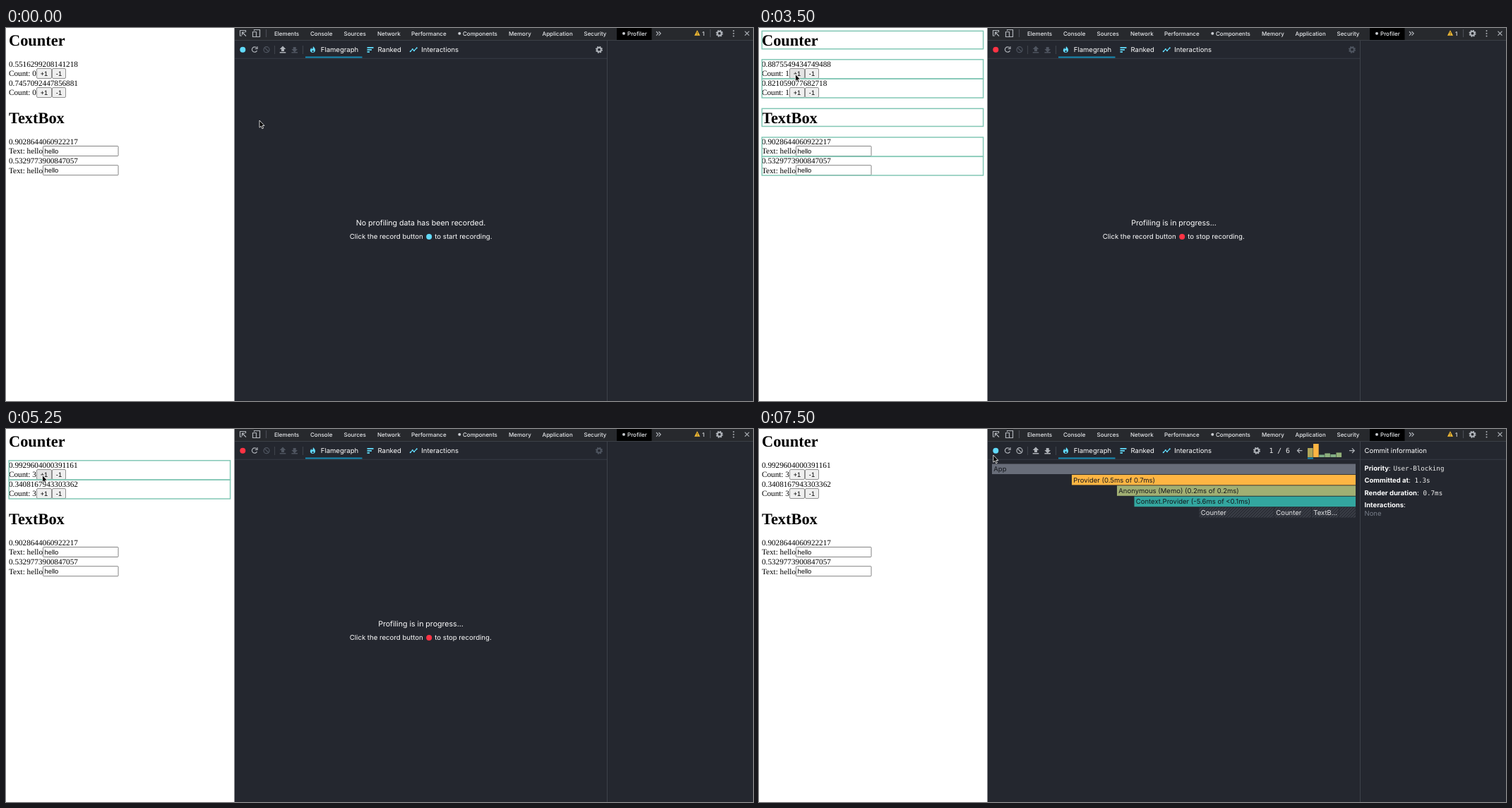
These frames come from a looping animation (1058 by 529 pixels, 8 s). An HTML page:

```html
<!DOCTYPE html>
<html lang="en">
<head>
<meta charset="utf-8">
<title>Profiler recording</title>
<style>
  html, body { margin: 0; width: 100%; height: 100%; overflow: hidden; background: #fff; }
  svg { display: block; width: 1058px; height: 529px; }
  text { white-space: pre; text-rendering: geometricPrecision; }
  .page { font: 11.2px "Liberation Serif", serif; }
  .heading { font: bold 22.4px "Liberation Serif", serif; }
  .control { font: 9.33px "Liberation Sans", sans-serif; }
  .tab { font: 500 8px Inter, sans-serif; fill: #e8eaed; }
  .ui { font: 9.5px Inter, sans-serif; fill: #fff; }
  .hint { font: 9.65px Inter, sans-serif; fill: #fff; }
  .title { font: 10.6px Inter, sans-serif; fill: #fff; }
  .bold { font-weight: 700; }
  .mono { font: 9.2px "DejaVu Sans Mono", monospace; fill: #eee; }
  .middle { text-anchor: middle; }
  .end { text-anchor: end; }
  .line { fill: none; stroke: currentColor; stroke-width: 1.2; }
</style>
</head>
<body>
<svg id="stage" viewBox="0 0 1058 529"></svg>
<script>
const STEP = 250, LOOP = 8000;
const BLUE = '#61dafb', RED = '#ff3344', BRIGHT = '#afb3b9', DIM = '#4f5560';

const text = (x, y, cls, content, extra = '') =>
  `<text x="${x}" y="${y}" class="${cls}" ${extra}>${content}</text>`;
const rect = (x, y, w, h, fill, extra = '') =>
  `<rect x="${x}" y="${y}" width="${w}" height="${h}" fill="${fill}" ${extra}/>`;
const dot = (x, y, r, fill, extra = '') => `<circle cx="${x}" cy="${y}" r="${r}" fill="${fill}" ${extra}/>`;
const path = (d, color = BRIGHT, extra = 'class="line"') =>
  `<path d="${d}" color="${color}" ${extra}/>`;
const group = (id, content) => `<g id="${id}">${content}</g>`;
const gear = (x, y) => `<g transform="translate(${x} ${y})" class="line">
  <circle r="2.9" stroke-width="2"/><circle r="4.3" stroke-width="1.5" stroke-dasharray="1.9 1.477"/></g>`;
const arrow = (x, dir) => `<path fill="currentColor" transform="translate(${x} 30) scale(1 ${dir})"
  d="M0-4.5L4.3 0H2V3H-2V0H-4.3Z"/>` + rect(x - 4.3, 34, 8.6, 1.5, 'currentColor');

function button(id, x, y, w, label) {
  return rect(x + .5, y + .5, w - 1, 14, '#efefef', `id="${id}" rx="1.5" stroke="#767676" stroke-width=".8"`) +
    text(x + w / 2, y + 11, 'control middle', label);
}

function counter(i) {
  const y = 54.6 + i * 27.2, top = 57 + i * 27;
  return text(4, y, 'page', '', `id="random${i}"`) + text(4, y + 13.5, 'page', '', `id="count${i}"`) +
    button('plus' + i, 43, top, 22, '+1') + button('minus' + i, 65, top, 20, '-1');
}

function textBox(i, value) {
  const y = 164.8 + i * 27.2;
  return text(4, y, 'page', value) + text(4, y + 13.5, 'page', 'Text: hello') +
    rect(52.5, 167.5 + i * 27.2, 106.5, 14, '#fff', 'stroke="#767676" stroke-width=".9" rx=".8"') +
    text(54.5, y + 13.2, 'control', 'hello');
}

const outlines = boxes => boxes.map(([y, h]) =>
  rect(4.2, y, 313.4, h, 'none', 'stroke="#82c7b5" stroke-width="1.5"')).join('');

function page() {
  return rect(0, 0, 324, 529, '#fff') +
    text(4, 24.5, 'heading', 'Counter') + counter(0) + counter(1) +
    text(4, 134.8, 'heading', 'TextBox') + textBox(0, '0.9028644060922217') + textBox(1, '0.5329773900847057') +
    group('counterOutlines', outlines([[44.7, 27.3], [72, 27]])) +
    group('otherOutlines', outlines([[4.3, 25.4], [114.3, 25.2], [155, 27.3], [182.3, 26.7]]));
}

function tabBar() {
  const tabs = [[380, 'Elements'], [431, 'Console'], [478.5, 'Sources'], [526, 'Network'], [574, 'Performance'],
    [647, 'Components'], [712, 'Memory'], [759.5, 'Application'], [818.5, 'Security'], [880, 'Profiler']];
  return rect(324, 0, 734, 17, '#27292d') + rect(324, 17, 734, 1, '#3c4047') + rect(865, 0, 49.5, 17, '#000') +
    tabs.map(([x, name]) => text(x, 10.6, 'tab', name)).join('') +
    dot(642.3, 7.7, 2, '#c8cbd0') + dot(875, 7.7, 2, '#c8cbd0') +
    path('M334 11H331.5V3.5H339.5V6M334.5 6L340 11.5M334.5 10V6H338.5') +
    path('M351.5 4V2.5H359.5V12.5H355M349.5 5.5H354.5V12.5H349.5Z') + path('M368.5 2V13', '#484c53') +
    path('M921 5L923.7 7.8L921 10.6M924.5 5L927.2 7.8L924.5 10.6') +
    path('M979 3L983 10.8H975Z', '', 'fill="#f5bd36"') + rect(978.6, 5.6, .9, 2.7, '#40310c') +
    rect(978.6, 9, .9, .9, '#40310c') + text(986, 10.6, 'tab', '1') + path('M997.5 2V13', '#484c53') +
    `<g color="${BRIGHT}">${gear(1010.5, 7.7)}</g>` +
    [4, 7.8, 11.6].map(y => dot(1030.5, y, 1, BRIGHT)).join('') +
    path('M1046.5 4.7L1052.5 10.7M1052.5 4.7L1046.5 10.7');
}

function toolbar() {
  return dot(335.3, 30.7, 4, BLUE, 'id="record"') +
    path('M355 28.2A3.7 3.7 0 1 0 355.5 32M356 26.3V29.5H352.8') +
    `<g id="clear" class="line"><circle cx="369" cy="30.7" r="4"/><path d="M366.2 27.9L371.8 33.5"/></g>` +
    group('upload', arrow(392, 1)) + group('download', arrow(408.7, -1)) +
    path('M380.5 25V37M420.5 25V37', '#3d424a') +
    path('M435 26C437 28 438.3 29.5 438 32C437.6 36 431.2 36 430.8 32C430.7 30 432 29 432.4 28C433 29 433 30 433.5 30C434.8 29 434.8 27.5 435 26Z',
      '', `fill="${BLUE}"`) + dot(434.6, 33, 1.2, '#24272f') +
    rect(511.5, 27, 9, 1.8, BLUE) + rect(511.5, 30, 6.5, 1.8, BLUE) + rect(511.5, 33, 3.5, 1.8, BLUE) +
    path('M572.5 33.5L575.8 30L578 32.2L582 28', BLUE) +
    [[572.7, 33.3], [575.8, 30], [578, 32.2], [581.8, 28.2]].map(([x, y]) => dot(x, y, 1, BLUE)).join('') +
    text(445.8, 34.1, 'ui', 'Flamegraph') + text(526.5, 34.1, 'ui', 'Ranked') + text(588.3, 34.1, 'ui', 'Interactions') +
    rect(424, 40.5, 80.5, 2, '#178fb9') + rect(324, 42.8, 527, .8, '#3d424a') + rect(851, 18, 1, 511, '#3d424a');
}

function message(id, title, action, color) {
  return group(id, text(587.5, 279.8, 'title middle', title) +
    text(590.7, 299.4, 'hint end', 'Click the record button') + dot(599.2, 296, 4, color) +
    text(607.3, 299.4, 'hint', `to ${action} recording.`));
}

function flamegraph() {
  const bars = [[330, 845, 0, '#686d79', 'App'], [443, 845, 1, '#feb543', 'Provider (0.5ms of 0.7ms)'],
    [507, 845, 2, '#a1af73', 'Anonymous (Memo) (0.2ms of 0.2ms)'],
    [531.5, 845, 3, '#33a69f', 'Context.Provider (-5.6ms of &lt;0.1ms)'],
    [623.5, 729, 4, 'url(#hatch)', 'Counter'], [730, 782, 4, 'url(#hatch)', 'Counter'],
    [783, 821, 4, 'url(#hatch)', 'TextB...'], [822, 845, 4, 'url(#hatch)', '']];
  const commits = [[13, '#afa557'], [19, '#feb543'], [3.5, '#7fae86'], [5.5, '#8db07c'], [4, '#82ae84'], [6.5, '#92b078']];
  const fields = [['Priority', 'User-Blocking', 58.8, 898.5], ['Committed at', '1.3s', 76.2, 928.5],
    ['Render duration', '0.7ms', 93.6, 940.5], ['Interactions', '', 111, 0]];
  return bars.map(([x, end, row, fill, label]) => {
    const y = 49.5 + row * 15.4;
    return rect(x, y, end - x, 14.5, fill) +
      text(x + 2.3, y + 10.7, 'ui', label, `style="fill:${row < 4 ? '#14171c' : '#e4e5e7'}"`);
  }).join('') +
    text(722.5, 34.1, 'mono', '1 / 6', 'style="font-size:9.8px"') +
    path('M769.5 30.7H762.5M765.8 27.4L762.5 30.7L765.8 34M836 30.7H843.3M840 27.4L843.3 30.7L840 34') +
    commits.map(([h, fill], i) => rect(777 + i * 8.1, 40 - h, 7.6, h, fill)).join('') + rect(777, 40.5, 8, 2, '#178fb9') +
    rect(852, 42.8, 206, .8, '#3d424a') + text(857.5, 34.1, 'ui', 'Commit information') +
    fields.map(([name, value, y, x]) =>
      text(857.5, y, 'ui', `<tspan class="bold">${name}</tspan>:`) + text(x, y, 'mono', value)).join('') +
    text(857.5, 122.7, 'ui', 'None', 'style="fill:#777d88"');
}

document.getElementById('stage').innerHTML = `<defs>
  <pattern id="hatch" width="3" height="3" patternUnits="userSpaceOnUse" patternTransform="rotate(45)">
    <rect width="3" height="3" fill="#292c34"/><rect width="1.2" height="3" fill="#41454e"/></pattern></defs>` +
  page() + rect(323.5, 0, 734.5, 529, '#24272f') + tabBar() + toolbar() + group('gear', gear(0, 30.7)) +
  message('idle', 'No profiling data has been recorded.', 'start', BLUE) +
  message('recording', 'Profiling is in progress...', 'stop', RED) +
  group('processing', text(587.5, 281.8, 'title middle', 'Processing data...') +
    text(587.5, 299.4, 'hint middle', 'This should only take a minute.')) +
  group('results', flamegraph()) +
  `<path id="cursor" d="M0 0V10.2L2.3 8.1L3.9 11.8L5.6 11L4 7.5H7Z" fill="#000" stroke="#fff" stroke-width=".8"/>`;

// Each track lists [start time, value]; a value holds until the next entry.
const tracks = {
  cursor: [[0, [359, 131]], [250, [255, 94]], [500, [128, 62]], [750, [66, 53]], [1000, [51.5, 65.5]],
    [1750, [190, 50]], [2000, [330.7, 36.7]], [2500, [150, 50]], [2750, [51.5, 65.5]],
    [5750, [60, 66]], [6000, [180, 58]], [6250, [329, 46]], [6500, [331.8, 37]]],
  mode: [[0, 'idle'], [2250, 'recording'], [7000, 'processing'], [7250, 'results']],
  count: [[0, 0], [3000, 1], [4000, 2], [5250, 3]],
  outline: [[0, 0], [3000, 1], [3250, 2], [3750, 0], [4000, 1], [4250, 2], [4750, 0], [5250, 1], [5750, 0]]
};
const randoms = [
  ['0.5516299208141218', '0.7457092447856881'], ['0.8875549434749488', '0.821059077682718'],
  ['0.14674945257951366', '0.731277836854284'], ['0.9929604000391161', '0.3408167943303362']];

const el = id => document.getElementById(id);
const show = (id, visible) => el(id).style.display = visible ? '' : 'none';
const at = (track, t) => track.findLast(([start]) => start <= t)[1];

function render(t) {
  const [x, y] = at(tracks.cursor, t), mode = at(tracks.mode, t);
  const count = at(tracks.count, t), outline = at(tracks.outline, t);
  const done = mode === 'results', recording = mode === 'recording';

  el('cursor').setAttribute('transform', `translate(${x} ${y})`);
  el('plus0').setAttribute('fill', x > 43 && x < 65 && y > 57 && y < 72 ? '#e3e3e3' : '#efefef');
  for (const i of [0, 1]) {
    el('random' + i).textContent = randoms[count][i];
    el('count' + i).textContent = 'Count: ' + count;
  }
  show('counterOutlines', outline > 0);
  show('otherOutlines', outline > 1);
  for (const name of ['idle', 'recording', 'processing', 'results']) show(name, mode === name);

  el('record').setAttribute('fill', recording ? RED : BLUE);
  el('upload').style.color = el('gear').style.color = recording ? DIM : BRIGHT;
  el('clear').style.color = el('download').style.color = done ? BRIGHT : DIM;
  el('gear').setAttribute('transform', `translate(${done ? 705 : 840} 0)`);
}

const begin = performance.now();
function frame() {
  const elapsed = (performance.now() - begin) % LOOP;
  render(Math.floor(elapsed / STEP) * STEP);
  requestAnimationFrame(frame);
}
frame();
</script>
</body>
</html>
```
